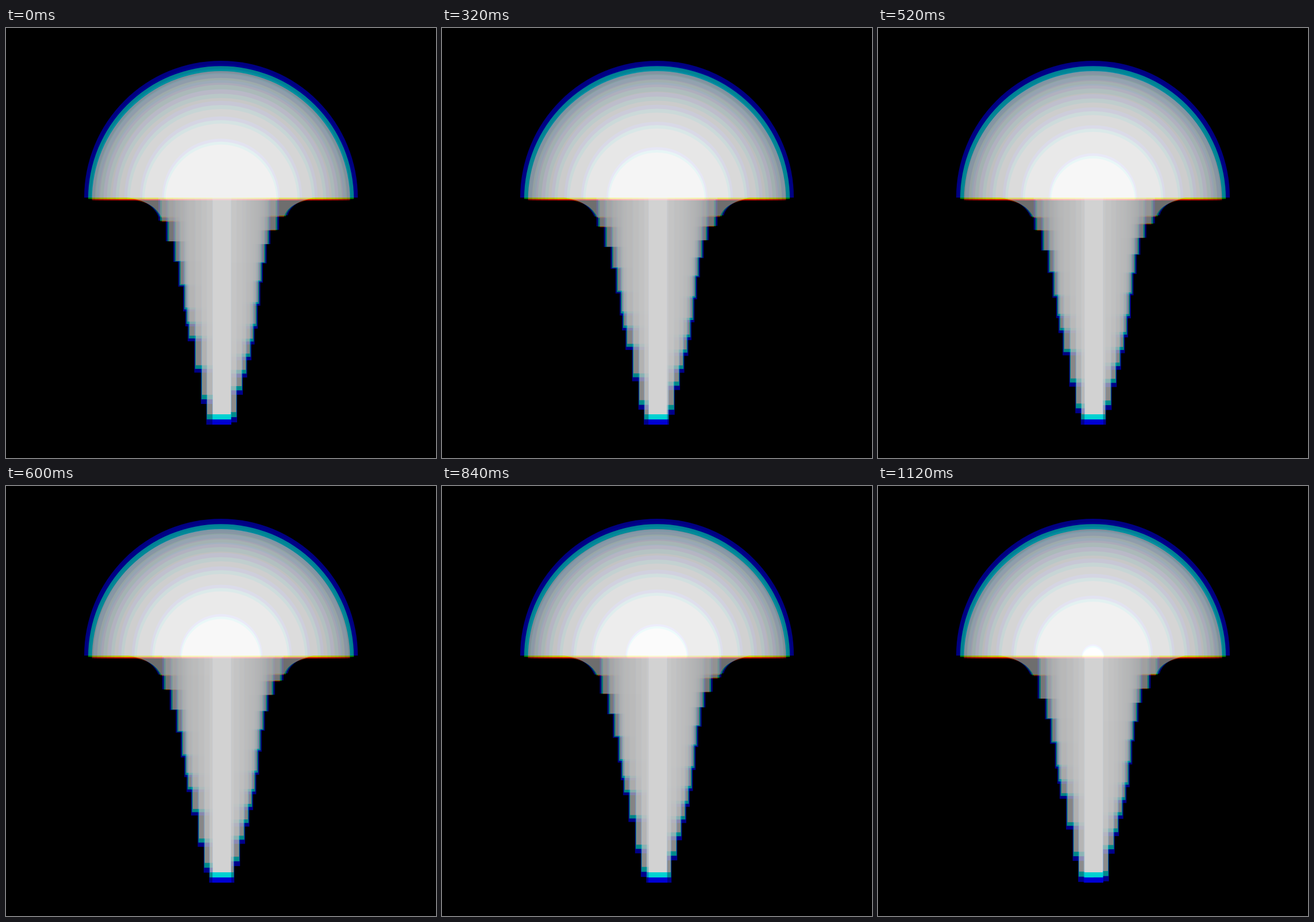
These frames come from a looping animation (748 by 748 pixels, 1.16 s). An HTML page with a canvas:

```html
<!DOCTYPE html>
<html>
<head>
<meta charset="utf-8">
<style>
  html, body { margin: 0; height: 100%; overflow: hidden; background: #000; }
  canvas { display: block; }
</style>
</head>
<body>
<canvas id="stage" width="748" height="748"></canvas>
<script>
const SIZE = 748, MID = 374, LOOP = 1160, STEPS = 29;
const BASE = 295, FOOT = 690, AXIS = 375;
const RADIUS = 238, SLICE = 23.2, RINGS = 9;
const stage = document.getElementById('stage').getContext('2d');
const layer = new OffscreenCanvas(SIZE, SIZE).getContext('2d');

// Key points of the stem's outline, from the cap down to the foot
const LEFT = [[265, 335], [291, 407], [308, 493], [316, 545], [339, 654], [358, 726]];
const RIGHT = [[490, 326], [460, 376], [447, 443], [438, 523], [427, 578], [412, 638], [392, 734]];

// Each channel is the same scene at its own scale
const CHANNELS = [
  [0.943, v => `rgb(${v},0,0)`],
  [0.971, v => `rgb(0,${v},0)`],
  [1, v => `rgb(0,0,${v})`]
];

const mix = (a, b, u) => a + (b - a) * u;

function pointAt(keys, s) {
  const i = Math.min(Math.floor(s), keys.length - 2);
  const [a, b] = [keys[i], keys[i + 1]];
  return [mix(a[0], b[0], s - i), Math.min(FOOT, mix(a[1], b[1], s - i))];
}

function skirt(shade) {
  layer.fillStyle = shade(110);
  layer.beginPath();
  layer.moveTo(212, BASE);
  layer.quadraticCurveTo(252, 299, 265, 328);
  layer.lineTo(490, 326);
  layer.quadraticCurveTo(497, 302, 535, BASE);
  layer.fill();
}

// Translucent columns, two per key point, slide along the outline
function columns(keys, shift, shade) {
  layer.globalAlpha = 0.7;
  for (let i = 0; i < 2 * (keys.length - 1); i++) {
    const [x, y] = pointAt(keys, (i + shift) / 2);
    layer.fillStyle = shade(Math.round(212 - 0.45 * Math.abs(x - AXIS)));
    layer.fillRect(x, BASE, AXIS - x, y - BASE);
  }
  layer.globalAlpha = 1;
}

function halfDisc(r, color) {
  layer.fillStyle = color;
  layer.beginPath();
  layer.arc(MID, BASE, r, Math.PI, 2 * Math.PI);
  layer.fill();
}

function dome(u, shade) {
  halfDisc(RADIUS, shade(128));
  for (let p = RINGS - u; p > 0; p--) {
    const h = p * SLICE;
    halfDisc(Math.sqrt(2 * RADIUS * h - h * h), shade(Math.round(255 - 14 * p)));
  }
}

function scene(u, scale, shade) {
  layer.setTransform(1, 0, 0, 1, 0, 0);
  layer.fillStyle = '#000';
  layer.fillRect(0, 0, SIZE, SIZE);
  layer.setTransform(scale, 0, 0, scale, MID * (1 - scale), MID * (1 - scale));
  skirt(shade);
  columns(LEFT, u, shade);
  columns(RIGHT, 1 - u, shade);
  layer.fillStyle = shade(210);
  layer.fillRect(359, BASE, 33, FOOT - BASE);
  dome(u, shade);
}

function draw() {
  const u = Math.floor(performance.now() % LOOP / LOOP * STEPS) / STEPS;
  stage.globalCompositeOperation = 'source-over';
  stage.fillStyle = '#000';
  stage.fillRect(0, 0, SIZE, SIZE);
  stage.globalCompositeOperation = 'lighter';
  for (const [scale, shade] of CHANNELS) {
    scene(u, scale, shade);
    stage.drawImage(layer.canvas, 0, 0);
  }
  requestAnimationFrame(draw);
}
draw();
</script>
</body>
</html>
```
